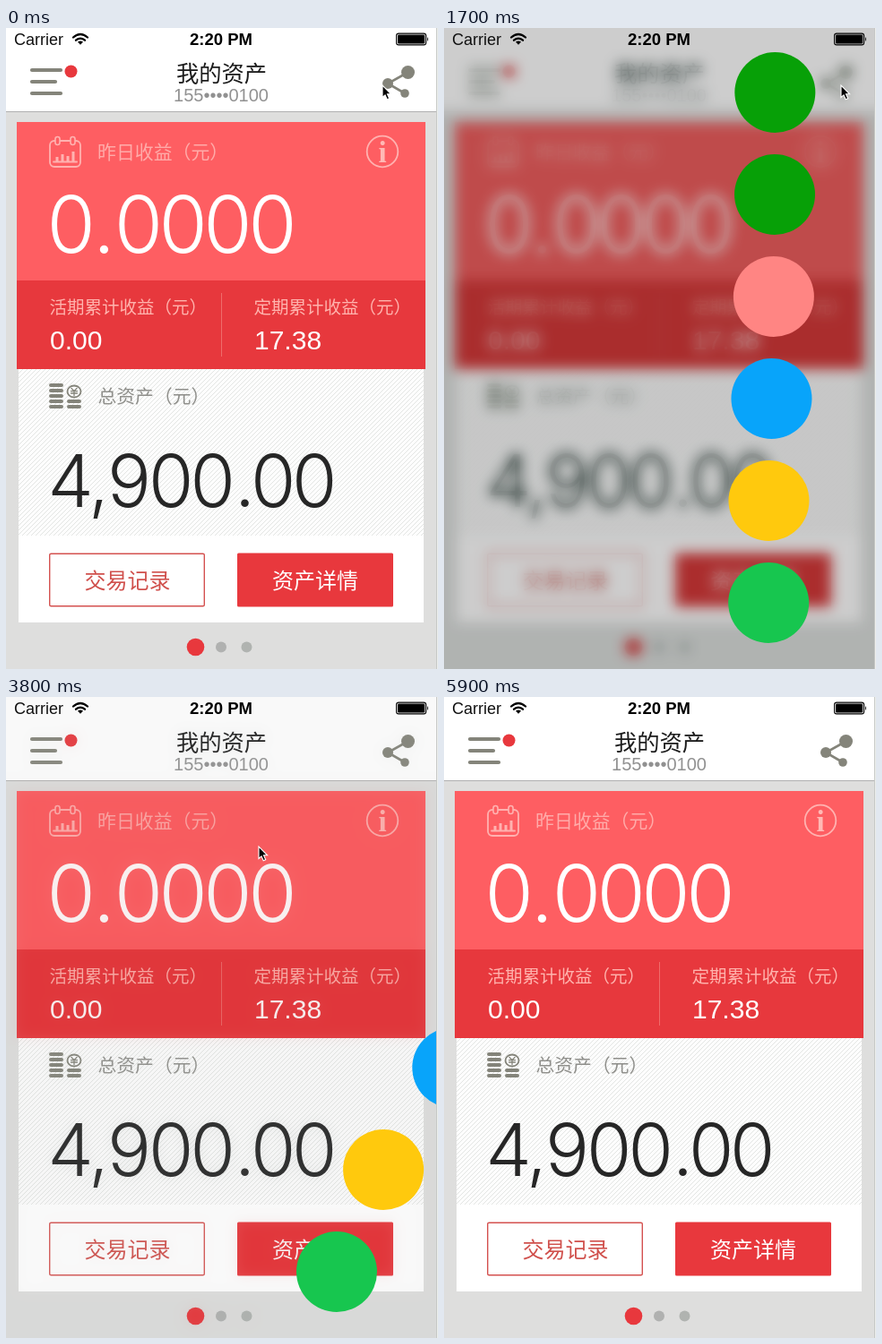
These frames come from a looping animation (482x716 px, 6 s). An HTML page:

```html
<!DOCTYPE html>
<html lang="zh-CN">
<head>
<meta charset="utf-8">
<title>我的资产</title>
<style>
html, body { margin: 0; width: 100%; height: 100%; overflow: hidden; background: #fff; }
svg { display: block; width: 482px; height: 716px; }
text { font-family: "Noto Sans CJK SC", "Noto Sans CJK", sans-serif; }
.num { font-family: "Liberation Sans", sans-serif; }
.big { font-family: Inter, sans-serif; font-weight: 300; }
.cjk { font-weight: 300; }
.mid { text-anchor: middle; }
.line { fill: none; stroke-linecap: round; }
</style>
</head>
<body>
<svg viewBox="0 0 482 716">
  <defs>
    <pattern id="hatch" width="5" height="5" patternUnits="userSpaceOnUse">
      <rect width="5" height="5" fill="#fdfdfd"/>
      <path d="M-1 1L1 -1M0 5L5 0M4 6L6 4" stroke="#e3e5e3" stroke-width="1"/>
    </pattern>
    <!-- blur and darken -->
    <filter id="soft" filterUnits="userSpaceOnUse" x="-30" y="-30" width="542" height="776" color-interpolation-filters="sRGB">
      <feGaussianBlur stdDeviation="7.500"/>
      <feColorMatrix values=".8 .08 0 0 -.08  0 .8 0 0 0  0 0 .82 0 -.02  0 0 0 1 0"/>
    </filter>
    <clipPath id="screen"><rect width="480" height="716"/></clipPath>
  </defs>

  <g clip-path="url(#screen)">
    <g id="page">
      <rect x="-40" y="-40" width="562" height="134" fill="#fff"/>
      <rect x="-40" y="94" width="562" height="670" fill="#dededd"/>
      <rect x="-40" y="93" width="562" height="1" fill="#b0b0b0"/>

      <!-- header -->
      <path class="line" d="M29 47H61M29 60H55M29 73H61" stroke="#84847a" stroke-width="4.2"/>
      <circle cx="72.5" cy="48.500" r="7" fill="#e8383d"/>
      <text class="mid" x="240.5" y="59.500" font-size="25.3" font-weight="500" fill="#1c1c1c">我的资产</text>
      <text class="num mid" x="240" y="82" font-size="20" fill="#919191">155••••0100</text>
      <g fill="#84847a">
        <path class="line" d="M448.500 49.500L426 62L445 73" stroke="#84847a" stroke-width="2.6"/>
        <circle cx="448.500" cy="49.500" r="7.500"/>
        <circle cx="426" cy="62" r="6"/>
        <circle cx="445" cy="73" r="4.800"/>
      </g>

      <!-- income -->
      <rect x="12" y="105" width="456" height="177" fill="#fe5e62"/>
      <rect x="12" y="282" width="456" height="99" fill="#e7383d"/>
      <g class="line" stroke="#ffb2b0" stroke-width="1.8">
        <rect x="49" y="126" width="34" height="29" rx="5"/>
        <path d="M53 149.500H79"/>
        <path d="M57 149v-5M63 149v-8M69 149v-6M75 149v-11" stroke-width="3" stroke-linecap="butt"/>
        <g fill="#fe5e62" stroke-width="1.6">
          <rect x="55" y="121.500" width="5" height="9" rx="2.500"/>
          <rect x="72" y="121.500" width="5" height="9" rx="2.500"/>
        </g>
        <circle cx="420" cy="138" r="17.300"/>
      </g>
      <text class="mid" x="420" y="149.500" font-size="33" font-weight="700" fill="#ffb9b5" style="font-family:'Liberation Serif',serif">i</text>
      <text class="cjk" x="102" y="145.500" font-size="20.9" fill="#ffaba9">昨日收益（元）</text>
      <text class="big" x="45.500 97 120.700 170.500 220.300 270.200" y="251" font-size="88" fill="#fff">0.0000</text>
      <g class="cjk" font-size="19.500" fill="#ffb3ad">
        <text x="48.500" y="319">活期累计收益（元）</text>
        <text x="276.500" y="319">定期累计收益（元）</text>
      </g>
      <g font-size="30" fill="#fff">
        <text class="num" x="49" y="359">0.00</text>
        <text class="num" x="277" y="359">17.38</text>
      </g>
      <path d="M240.500 296V367" stroke="#ef6c6b"/>

      <!-- total -->
      <rect x="14" y="381" width="452" height="187" fill="url(#hatch)"/>
      <rect x="14" y="567" width="452" height="97" fill="#fff"/>
      <path class="line" d="M50 399H62M50 405H62M50 411H62M50 417H62M50 423H62M70 417H82M70 423H82" stroke="#84847a" stroke-width="4"/>
      <ellipse cx="76" cy="406" rx="7.500" ry="6.500" fill="#fdfdfd" stroke="#84847a" stroke-width="1.8"/>
      <path class="line" d="M73 402.500l3 3 3-3M72.500 405.700h7M72.500 408h7M76 405.500v5" stroke="#84847a" stroke-width="1.3"/>
      <text class="cjk" x="102.500" y="418.500" font-size="20.8" fill="#8f8f8b">总资产（元）</text>
      <text class="big" x="46.500 92 113 159 205.500 255 273 319" y="535" font-size="81.500" fill="#262626">4,900.00</text>
      <rect x="48.700" y="587.200" width="172.600" height="58.600" rx="1.500" fill="#fff" stroke="#d4514f" stroke-width="1.4"/>
      <rect x="258" y="586.500" width="174" height="60" rx="1.500" fill="#e8383d"/>
      <g class="mid" font-size="24">
        <text x="135.500" y="625.500" fill="#d0504c">交易记录</text>
        <text x="345" y="625.500" fill="#fff">资产详情</text>
      </g>

      <circle cx="211.500" cy="691.500" r="9.800" fill="#e8383d"/>
      <circle cx="240" cy="691.500" r="6" fill="#b0b1b0"/>
      <circle cx="268.500" cy="691.500" r="6" fill="#b0b3b0"/>
    </g>

    <g id="veil" opacity="0">
      <use href="#page" filter="url(#soft)"/>
    </g>

    <!-- status bar -->
    <text class="num" x="9" y="19" font-size="18" fill="#111">Carrier</text>
    <text class="num mid" x="240" y="19" font-size="18.500" font-weight="700" fill="#000">2:20 PM</text>
    <path class="line" d="M75 10.500Q83 3.500 91 10.500M78 13.700Q83 9.500 88 13.700" stroke="#000" stroke-width="2.3" stroke-linecap="butt"/>
    <path d="M80 15.500Q83 13.300 86 15.500L83 18.800z"/>
    <rect x="435.600" y="6.100" width="33" height="12.800" rx="2.500" fill="none" stroke="#000" stroke-width="1.1"/>
    <rect x="437" y="7.500" width="30.200" height="10" rx="1.200"/>
    <path d="M470 10q2 2.500 0 5z"/>

    <g id="buttons"></g>
    <path id="cursor" d="M0 0V13.500L3 10.800 5.200 15.800 7.700 14.700 5.500 9.800H9.600z" fill="#000" stroke="#fff" stroke-width="1.1"/>
  </g>
  <rect x="480" width="1" height="716" fill="#c6c8c6"/>
  <rect x="481" width="1" height="716" fill="#eef0ee"/>
</svg>
<script>
const LOOP = 6000, STEP = 100;
const OPEN = 867, CLOSE = 3236;
const HOME = 369, AWAY = 530;
const colors = ['#07a007', '#07a007', '#ff8583', '#08a4fa', '#ffc90d', '#17c64f'];
const byId = id => document.getElementById(id);
const veil = byId('veil'), cursor = byId('cursor');

const buttons = colors.map((fill, i) => {
  const c = document.createElementNS('http://www.w3.org/2000/svg', 'circle');
  c.setAttribute('cy', 72 + 114 * i);
  c.setAttribute('r', 45);
  c.setAttribute('fill', fill);
  byId('buttons').append(c);
  return c;
});

const ramp = (t, from, to) => Math.min(1, Math.max(0, (t - from) / (to - from)));
const smooth = u => u * u * (3 - 2 * u);

// Step response of a damped spring, 0 to 1 with a small overshoot.
function spring(ms) {
  if (ms <= 0) return 0;
  const w = 7.42, a = 7.27, s = ms / 1000;
  return 1 - Math.exp(-a * s) * (Math.cos(w * s) + a / w * Math.sin(w * s));
}

function buttonX(i, t) {
  const shown = spring(t - OPEN - 89 * i) - spring(t - CLOSE - 116 * i);
  return t > 4050 ? AWAY : AWAY + (HOME - AWAY) * shown;
}

function draw(t) {
  buttons.forEach((b, i) => b.setAttribute('cx', buttonX(i, t).toFixed(2)));
  veil.setAttribute('opacity', ramp(t, OPEN, 1725) - ramp(t, CLOSE, 3866));
  const a = smooth(ramp(t, 200, 700)), b = smooth(ramp(t, 2200, 2900));
  const x = 420 + 23 * a - 161 * b, y = 64 + 103 * b;
  cursor.setAttribute('transform', `translate(${x.toFixed(1)} ${y.toFixed(1)})`);
  cursor.setAttribute('visibility', t < 5000 ? 'visible' : 'hidden');
}

const start = performance.now();
function tick() {
  const t = (performance.now() - start) % LOOP;
  draw(Math.floor(t / STEP) * STEP);
  requestAnimationFrame(tick);
}
tick();
</script>
</body>
</html>
```
